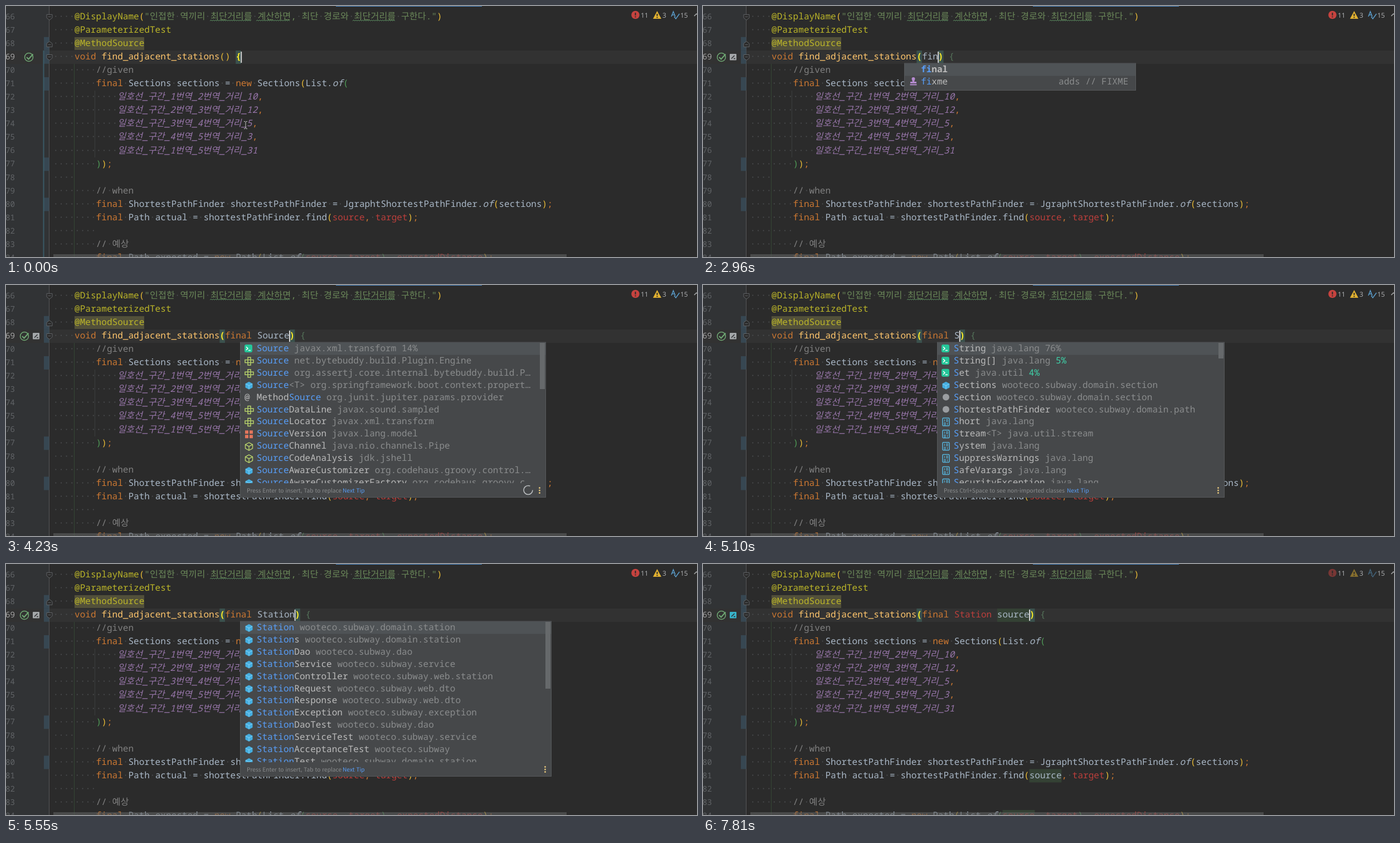
An HTML page for the animation above (8000 ms loop, 1240 px wide and 451 px high).

```html
<!DOCTYPE html>
<html lang="ko">
<head>
<meta charset="utf-8">
<title>Editor</title>
<style>
html, body { margin: 0; width: 100%; height: 100%; overflow: hidden; background: #2b2b2b; }
svg { display: block; }
text {
  font: 16.07px "Noto Sans Mono", "Noto Sans CJK KR", "Noto Sans CJK", monospace;
  fill: #a9b7c6; white-space: pre; text-rendering: geometricPrecision;
}
.ko { font-size: 16.25px; }
.num { font-size: 14.2px; fill: #606366; text-anchor: end; }
.num.now { fill: #a4a3a3; }
.ann { fill: #bbb529; }
.str { fill: #6a8759; }
.com { fill: #808080; }
.key { fill: #cc7832; }
.fun { fill: #ffc66d; }
.con { fill: #9876aa; font-style: italic; }
.ital { font-style: italic; }
.err { fill: #bc3f3c; }
.p1 { fill: #e8ba36; }
.p2 { fill: #4f9a57; }
.dim { fill: #55735a; }
.hit { fill: #ffef28; font-weight: 700; }
.dot { fill: #4c4e50; font-style: normal; }
.item { fill: #bbbbbb; }
.bold { font-weight: 700; }
.info { fill: #8a8c8d; }
.pct { fill: #3fd0a8; }
.tip { font: 10.2px "Noto Sans CJK KR", "Noto Sans CJK", "Noto Sans", sans-serif; fill: #8a8c8d; }
.badge { font: 12px "Noto Sans", "Open Sans", sans-serif; fill: #a7a9ab; }
.m { fill: #589df6; }
</style>
</head>
<body>
<svg id="stage" width="1240" height="451" viewBox="0 0 1240 451">
  <rect width="1240" height="451" fill="#2b2b2b"/>
  <rect width="78" height="451" fill="#313335"/>
  <rect y="80" width="1240" height="24" fill="#323232"/>
  <rect x="592" width="262" height="1" fill="#4a88c7"/>
  <rect x="123" y="56" width="125" height="23" fill="#52503a"/>
  <g id="gutter"></g>
  <g id="marks"></g>
  <g id="code"></g>
  <g id="row"></g>
  <rect x="85" y="446" width="921" height="5" fill="#606162" opacity=".6"/>
  <g id="badges"></g>
  <g id="popup"></g>
  <path id="mouse" d="M-3-6.5h2l1 1 1-1h2M0-5.5v11M-3 6.5h2l1-1 1 1h2" fill="none" stroke="#c8c8c8"/>
</svg>
<script>
const CW = 9.64, LEFT = 84.5, PITCH = 24.06, LOOP = 8000;
const $ = id => document.getElementById(id);
const baseY = n => 96.1 + (n - 69) * PITCH;
const midY = n => 91.5 + (n - 69) * PITCH;
const colX = c => LEFT + (c + 4) * CW;
const esc = s => s.replace(/</g, '&lt;');
const span = (cls, s) => `<tspan class="${cls}">${s}</tspan>`;
const text = (x, y, s, cls = '') => `<text x="${x}" y="${y}" class="${cls}">${s}</text>`;
const rect = (x, y, w, h, fill, extra = '') =>
  `<rect x="${x}" y="${y}" width="${w}" height="${h}" fill="${fill}" ${extra}/>`;
const path = (d, stroke, extra = '') => `<path d="${d}" fill="none" stroke="${stroke}" ${extra}/>`;
const dots = s => s.replace(/ +/g, m => span('dot', '·'.repeat(m.length)));
const hangul = s => s.replace(/[가-힣]+/g, m => span('ko', m));
const at = (track, t) => track.filter(e => e[0] <= t).pop();

// ---- code ----
const lines = {
  66: '    @DisplayName("인접한 역끼리 최단거리를 계산하면, 최단 경로와 최단거리를 구한다.")',
  67: '    @ParameterizedTest',
  68: '    @MethodSource',
  70: '        //given',
  71: '        final Sections sections = new Sections(List.of(',
  72: '            일호선_구간_1번역_2번역_거리_10,',
  73: '            일호선_구간_2번역_3번역_거리_12,',
  74: '            일호선_구간_3번역_4번역_거리_5,',
  75: '            일호선_구간_4번역_5번역_거리_3,',
  76: '            일호선_구간_1번역_5번역_거리_31',
  77: '        ));',
  78: '    ',
  79: '        // when',
  80: '        final ShortestPathFinder shortestPathFinder = JgraphtShortestPathFinder.of(sections);',
  81: '        final Path actual = shortestPathFinder.find(source, target);',
  82: '        ',
  83: '        // 예상',
  84: '        final Path expected = new Path(List.of(source, target), expectedDistance);'
};
const kinds = ['ann', 'str', 'com', 'key', 'con', 'ital', 'err', 'key'];
const grammar = /(@\w+)|("[^"]*")|(\/\/.*)|(\b(?:final|new)\b)|(일호선[\w가-힣]+)|(\bof\b)|(\b(?:source|target|expectedDistance)\b)|([,;])|[()]| +/g;

function paint(src, depth) {
  return src.replace(grammar, (s, ...g) => {
    if (s === '(') return span('p' + ++depth, s);
    if (s === ')') return span('p' + depth--, s);
    const i = g.slice(0, 8).findIndex(Boolean);
    return i < 0 ? dots(s) : span(kinds[i], hangul(dots(s)));
  });
}

function wave(x, end) {
  let d = `M${x} 27`;
  for (let i = 0; x + i * 2 < end; i++) d += `l2 ${i % 2 ? 2 : -2}`;
  return path(d, '#5c8f61');
}

$('code').innerHTML =
  path('M122.5 104V451', '#344634') + path('M159.5 152V272', '#3b3d3e') +
  Object.entries(lines).map(([n, s]) =>
    `<g id="l${n}">${text(LEFT, baseY(n), paint(s, n == 77 ? 2 : 0))}</g>`).join('') +
  wave(366, 440) + wave(449, 509) + wave(622, 697);

function fold(n, up) {
  const k = up ? -1 : 1, y = midY(n) + 1;
  return `<path d="M73 ${y - 5 * k}h10v${6 * k}l-5 ${4 * k}l-5 ${-4 * k}z" fill="#2b2b2b" stroke="#606366"/>` +
    path(`M75.5 ${y - k}h5`, '#606366');
}

let gutter = path('M77.5 0V451', '#555759');
for (const n of [68, 69, 71, 77, 80]) gutter += rect(68, midY(n) - 11.7, 9.5, 24, '#374752');
for (let n = 66; n <= 84; n++) gutter += text(16, baseY(n) - .1, n, n === 69 ? 'num now' : 'num');
$('gutter').innerHTML = gutter + fold(66) + fold(68, true) + fold(69);

$('badges').innerHTML =
  `<g id="lamps"><circle cx="1129.5" cy="16" r="7.3" fill="#c7433f"/>` +
  path('M1129.5 12v5M1129.5 18.5v2', '#2b2b2b', 'stroke-width="2"') +
  `<path d="M1168.5 9l7.5 14h-15z" fill="#e0b030"/>` +
  path('M1168.5 14v4M1168.5 19.5v2', '#2b2b2b', 'stroke-width="2"') +
  path('M1194 19l3.5-9 3.5 9M1195.5 16h4M1199 19l3 4 6.5-9', '#5a9bc8', 'stroke-width="1.5"') + '</g>' +
  text(1139, 21, '11', 'badge') + text(1178, 21, '3', 'badge') + text(1210, 21, '15', 'badge') +
  path('M1235 18l4-4 4 4', '#a7a9ab', 'stroke-width="1.5"');

// ---- completion lists: icon, name, detail, share ----
const hex = 'l6.5 3.5v7l-6.5 3.5l-6.5-3.5v-7z';
const icons = {
  star: y => rect(428, y - 7, 14, 14, '#25c69a', 'rx="3"') +
    path(`M431 ${y - 3}l3 3-3 3M435 ${y + 3.5}h4`, '#fff', 'stroke-width="1.5"'),
  cls: y => `<path d="M436 ${y - 6}${hex}" fill="#45aee0"/>` + path(`M430 ${y - 2}l6 3 6-3M436 ${y + 1}v6`, '#8ad4f3'),
  file: y => `<circle cx="436" cy="${y}" r="6" fill="#9a9da0"/>`,
  bin: y => rect(430, y - 6.5, 12, 14, 'none', 'rx="1.5" stroke="#56b4dc" stroke-width="1.5"') +
    path(`M433.5 ${y - 4}v4M437 ${y - 4}h2v4h-2zM433 ${y + 2}h2v4h-2zM438.5 ${y + 2}v4`, '#56b4dc'),
  face: y => path(`M434 ${y - 6}h5v4.5h5v5h-5v4.5h-5v-4.5h-5v-5h5zM434 ${y - 1.5}h5v5h-5z`, '#b5cf6b', 'stroke-width="1.5"'),
  at: y => text(428, y + 5.5, '@', 'item'),
  enum: y => [[429, -6], [437, -6], [429, 2], [437, 2]].map(([x, d]) => rect(x, y + d, 6, 6, '#e2765c')).join(''),
  abs: y => path(`M436 ${y - 6}${hex}M429.5 ${y - 2.5}l6.5 3.5 6.5-3.5M436 ${y + 1}v7`, '#b9d36c', 'stroke-width="1.4"'),
  stamp: y => `<path d="M372 ${y + 3}v-3h4l-1.5-5a3 3 0 0 1 6 0l-1.5 5h4v3z" fill="#b58bd0"/>` +
    rect(371.5, y + 4.5, 12, 2, '#b58bd0')
};
const hint = 'Press Enter to insert, Tab to replace', dom = 'wooteco.subway.domain.', web = 'wooteco.subway.web.';
const popups = {
  word: { x: 361, w: 416, h: 49, pad: 30, rows: [['', 'final', ''], ['stamp', 'fixme', '']] },
  s: {
    x: 420, w: 516, h: 279, pad: 29.8, tip: 'Press Ctrl+Space to see non-imported classes', link: 653, thumb: 28,
    rows: [['star', 'String', 'java.lang 76%'], ['star', 'String[]', 'java.lang', '5%'], ['star', 'Set', 'java.util', '4%'],
      ['cls', 'Sections', dom + 'section'], ['file', 'Section', dom + 'section'], ['file', 'ShortestPathFinder', dom + 'path'],
      ['bin', 'Short', 'java.lang'], ['bin', 'Stream<T>', 'java.util.stream'], ['bin', 'System', 'java.lang'],
      ['bin', 'SuppressWarnings', 'java.lang'], ['bin', 'SafeVarargs', 'java.lang'], ['bin', 'SecurityException', 'java.lang']]
  },
  source: {
    x: 420, w: 549, h: 279, pad: 29.8, tip: hint, link: 604, thumb: 83, busy: 'ring',
    rows: [['star', 'Source', 'javax.xml.transform 14%'], ['face', 'Source', 'net.bytebuddy.build.Plugin.Engine'],
      ['face', 'Source', 'org.assertj.core.internal.bytebuddy.build.P…'], ['cls', 'Source<T>', 'org.springframework.boot.context.propert…'],
      ['at', 'MethodSource', 'org.junit.jupiter.params.provider'], ['face', 'SourceDataLine', 'javax.sound.sampled'],
      ['face', 'SourceLocator', 'javax.xml.transform'], ['enum', 'SourceVersion', 'javax.lang.model'],
      ['abs', 'SourceChannel', 'java.nio.channels.Pipe'], ['abs', 'SourceCodeAnalysis', 'jdk.jshell'],
      ['cls', 'SourceAwareCustomizer', 'org.codehaus.groovy.control.…'], ['cls', 'SourceAwareCustomizerFactory', 'org.codehaus.groovy.c…']]
  },
  stat: {
    x: 420, w: 549, h: 115, pad: 29.8, tip: hint, link: 604, busy: 'rays',
    rows: [['cls', 'StackTraceElement', 'java.lang'], ['cls', 'IllegalStateException', 'java.lang'],
      ['cls', 'IllegalMonitorStateException', 'java.lang'], ['cls', 'IllegalThreadStateException', 'java.lang']]
  },
  station: {
    x: 420, w: 559, h: 279, pad: 29.8, tip: hint, link: 604, thumb: 120,
    rows: [['cls', 'Station', dom + 'station'], ['cls', 'Stations', dom + 'station'], ['cls', 'StationDao', 'wooteco.subway.dao'],
      ['cls', 'StationService', 'wooteco.subway.service'], ['cls', 'StationController', web + 'station'],
      ['cls', 'StationRequest', web + 'dto'], ['cls', 'StationResponse', web + 'dto'], ['cls', 'StationException', 'wooteco.subway.exception'],
      ['cls', 'StationDaoTest', 'wooteco.subway.dao'], ['cls', 'StationServiceTest', 'wooteco.subway.service'],
      ['cls', 'StationAcceptanceTest', 'wooteco.subway'], ['cls', 'StationTest', dom + 'station']]
  },
  name: { x: 519, w: 416, h: 49, pad: 8.5, rows: [['', 'source', ''], ['', 'station', '']] }
};

// Colours the typed letters: as one run when possible, else one by one.
function match(name, typed) {
  const [, head, tail] = /^([^<]*)(.*)$/.exec(name);
  const i = head.toLowerCase().indexOf(typed.toLowerCase());
  let k = 0;
  const out = i >= 0
    ? head.slice(0, i) + span('m', head.slice(i, i + typed.length)) + head.slice(i + typed.length)
    : [...head].map(c => typed[k] && c.toLowerCase() === typed[k].toLowerCase() ? (k++, span('m', c)) : c).join('');
  return out + (tail ? span('info', esc(tail)) : '');
}

function drawPopup(id, typed) {
  const p = popups[id];
  if (!p) return '';
  const { x, w, h } = p, right = x + w, end = 103 + h, clip = p.tip ? h - 26 : h;
  let s = rect(x + .5, 103, w - 1, h - .5, '#46484a', 'stroke="#56595b"') + rect(x + 1, 103.5, w - 2, 22, '#4f5356');
  s += `<svg x="${x}" y="103" width="${w}" height="${clip}" viewBox="${x} 103 ${w} ${clip}">`;
  p.rows.forEach(([icon, name, info, share], i) => {
    const y = 114 + i * 21.9;
    if (icon) s += icons[icon](y);
    s += text(x + p.pad, y + 5, match(name, typed) + ' ' + span('info', info) + (share ? ' ' + span('pct', share) : ''),
      id === 'word' && !i ? 'item bold' : 'item');
  });
  s += '</svg>';
  if (id === 'word') s += text(638, 141, 'adds // FIXME', 'info');
  if (p.thumb) s += rect(right - 11, 104, 9, p.thumb, '#66696b');
  if (p.tip) {
    const y = end - 13;
    s += text(432, y + 3.5, p.tip, 'tip') + text(p.link, y + 3.5, 'Next Tip', 'tip m');
    s += [-4.5, 0, 4.5].map(d => `<circle cx="${right - 11.5}" cy="${y + d}" r="1.5" fill="#e0c27a"/>`).join('');
    if (p.busy === 'ring')
      s += `<circle cx="937" cy="${y - .5}" r="8" fill="none" stroke="#b9bcbe" stroke-width="1.6" stroke-dasharray="41 9.3"/>`;
    if (p.busy === 'rays') for (let a = 0; a < 8; a++)
      s += path('M3.5 0h3.5', '#b0b3b5', `stroke-width="2" opacity="${.3 + a * .09}" transform="translate(937.5 ${y}) rotate(${a * 45})"`);
  }
  return s;
}

// ---- timeline ----
function type(word, times, before = '') {
  return times.map((t, i) => [t, before + word.slice(0, i + 1)]);
}
const TYPE = 2740, CALM = 6220, RENAME = 6720, ACCEPT = 7000, RESOLVED = 7590, UNKNOWN = 7700;
const typing = [[0, ''],
  ...type('final ', [TYPE, 2800, 2960, 3030, 3110, 3190]),
  ...type('Source ', [3440, 3720, 3850, 3980, 4100, 4170, 4290], 'final '),
  [4690, 'final '],
  ...type('Station ', [4940, 5160, 5220, 5280, 5370, 5440, 5500, 5950], 'final '),
  [6600, 'final Station s'], [6940, 'final Station source']];
const showing = [[0], [2800, 'word'], [3190], [3660, 's'], [3790, 'source'], [4290],
  [5100, 's'], [5220, 'stat'], [5550, 'station'], [5950], [6660, 'name'], [6940]];
const blink = [[0, 1], [370, 0], [1090, 1], [2460, 0], [TYPE, 1]];
const moves = [[0, 31], [1470, 30], [1540, 29], [1670, 28]];

function drawRow(t, arg) {
  const caret = t < TYPE ? at(moves, t)[1] : 28 + arg.length;
  const brace = at(moves, t)[1] > 29, close = 28 + arg.length;
  let bg = '';
  for (const c of brace ? [30] : [27, close]) bg += rect(colX(c), 80, CW, 24, '#3b514d');
  if (t >= ACCEPT) bg += rect(colX(42), 80, 6 * CW, 24, '#344134') +
    rect(585.5, 368.5, 6 * CW, 24, '#344134') + rect(537.5, 442, 6 * CW, 9, '#344134');
  if (brace) bg += path('M67.5 80V451', '#3a5a66', 'stroke-width="2"');
  const edited = t >= TYPE;
  bg += `<g transform="translate(${edited ? -8 : 0} 0)"><circle cx="41" cy="92" r="7.5" fill="none" stroke="#6fa873" stroke-width="1.5"/>` +
    path('M37 92l3.5 3.5 8-9', '#6fa873', 'stroke-width="2"') + '</g>';
  if (edited) bg += rect(48, 86, 12, 11.5, t >= RENAME ? '#38b3c9' : '#a4a7a9', 'rx="1"') +
    path('M51 94.5l5.5-5.5M55 94.5h3', '#313335', 'stroke-width="1.6"');
  $('marks').innerHTML = bg;

  let inner = arg.replace(/^f\w*(?= |$)/, s => s === 'final' ? span('key', s) : s);
  if (t >= UNKNOWN) inner = inner.replace('Station', span('err', 'Station'));
  const paren = brace ? 'p1' : 'hit';
  $('row').innerHTML =
    text(LEFT, baseY(69), dots('    ') + span('key', 'void') + ' ' + span('fun', 'find_adjacent_stations') +
      span(paren, '(') + inner + span(paren, ')') + ' ' + span(brace ? 'hit' : 'dim', '{')) +
    (at(blink, t)[1] ? rect(colX(caret) - .7, 82, 2, 20, '#d4d4d4') : '');
}

const ease = p => p * p * (3 - 2 * p);
const part = (t, a, b) => ease(Math.min(1, Math.max(0, (t - a) / (b - a))));
const sourceArg = $('l81').querySelector('.err');
let last = '';

function frame(now) {
  const t = now % LOOP, arg = at(typing, t)[1], list = at(showing, t)[1];
  const key = [arg, list, at(blink, t)[1], at(moves, t)[1],
    ...[CALM, RENAME, ACCEPT, RESOLVED, UNKNOWN].map(k => t >= k)].join();
  if (key !== last) {
    last = key;
    drawRow(t, arg);
    $('popup').innerHTML = drawPopup(list, list === 'word' ? arg.slice(0, 2) : arg.split(' ').pop());
    $('lamps').setAttribute('opacity', t >= CALM ? .5 : 1);
    sourceArg.setAttribute('class', t >= RESOLVED ? '' : 'err');
  }
  const a = part(t, 310, 430), b = part(t, 650, 1340);
  $('mouse').setAttribute('transform', `translate(${430 - 74.5 * a + 64 * b} ${214 + 37 * a - 152 * b})`);
  $('mouse').setAttribute('visibility', t < 2270 ? 'visible' : 'hidden');
}

function tick() {
  frame(performance.now());
  requestAnimationFrame(tick);
}
tick();
</script>
</body>
</html>
```
